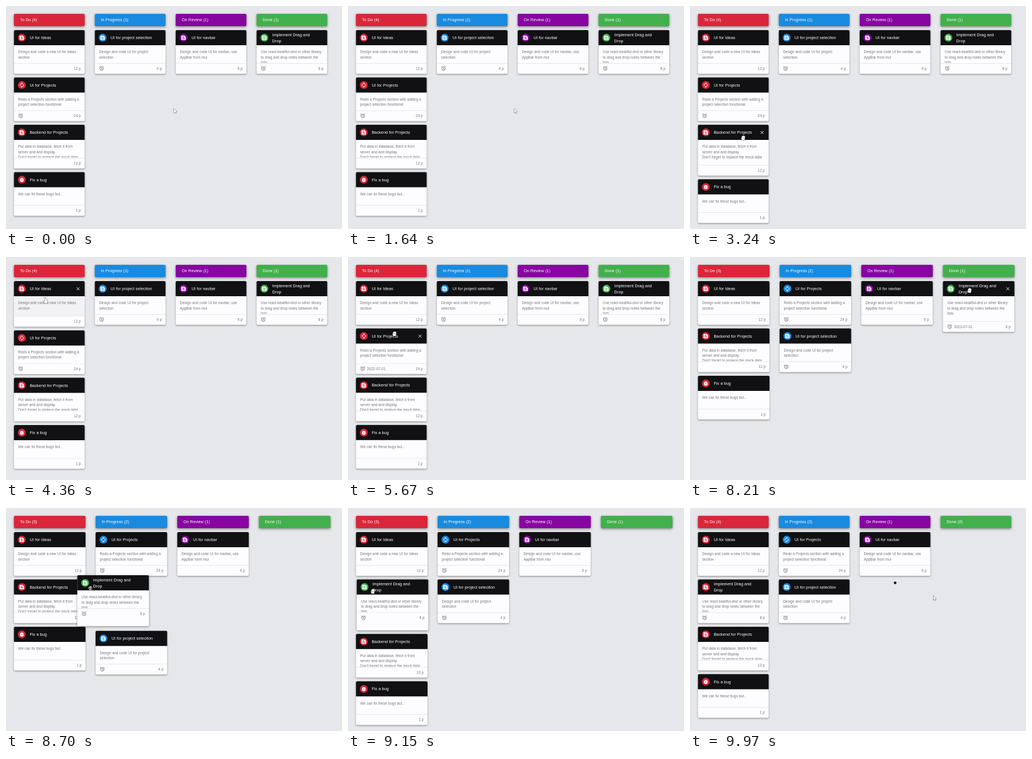
Recreate the animation shown at these times as an HTML page with a canvas. Size 600 by 398 pixels, loop 10000 ms.

```html
<!DOCTYPE html>
<html lang="en">
<head>
<meta charset="utf-8">
<title>Task board</title>
<style>
html, body { margin: 0; width: 100%; height: 100%; overflow: hidden; background: #e6e7ea; }
canvas { display: block; width: 600px; height: 398px; }
</style>
</head>
<body>
<canvas id="stage"></canvas>
<script>
const W = 600, H = 398, LOOP = 10000;
const cv = document.getElementById('stage');
const g = cv.getContext('2d');
const dpr = window.devicePixelRatio || 1;
cv.width = W * dpr;
cv.height = H * dpr;

const FONT = '"Liberation Sans", Arial, sans-serif';
const LEFT = 14.2, TOP = 43, CARD_H = 78, GAP = 6.5, HEAD = 27;
const EXTRA = [0, 0, 3.4, 12.8];
const COLUMNS = [['To Do', '#d9263a'], ['In Progress', '#1a8ade'], ['On Review', '#8706a0'], ['Done', '#42b04d']];

const card = (title, body, points, icon, alarm, hover) => ({ title, body, points, icon, alarm, hover });
const ideas = card(['UI for Ideas'], ['Design and code a new UI for Ideas', 'section'],
  12, 'doc', false, [[3780, 5560]]);
const projects = card(['UI for Projects'], ['Redo a Projects section with adding a', 'project selection functional'],
  24, 'sync', true, [[3450, 3780], [5560, 7600]]);
const backend = card(['Backend for Projects'],
  ['Put data in database, fetch it from', 'server and and display.', "Don't forget to replace the mock data"],
  12, 'doc', false, [[2600, 3450]]);
const bug = card(['Fix a bug'], ['We can fix these bugs but..'], 1, 'bug', false, []);
const picker = card(['UI for project seleciton'], ['Design and code UI for project', 'selection'], 4, 'doc', true, []);
const navbar = card(['UI for navbar'], ['Design and code UI for navbar, use', 'AppBar from mui'],
  6, 'doc', false, [[7780, 7950]]);
const dnd = card(['Implement Drag and', 'Drop'],
  ['Use react-beatiful-dnd or other library', 'to drag and drop notes between the', 'lists'],
  8, 'doc', true, [[8020, 9440]]);

// Board states; each drag ends by switching to the next state.
const STATES = [
  { end: 7520, pitch: 144.4, width: 126.3,
    lists: [[ideas, projects, backend, bug], [picker], [navbar], [dnd]],
    drag: { card: projects, lift: 6480, drop: 7220, dx: 68.7, dy: 16, to: [158.6, TOP],
      shifts: [[backend, 6707, -1], [bug, 6707, -1], [picker, 6880, 1]] } },
  { end: 9300, pitch: 145.8, width: 127.8,
    lists: [[ideas, backend, bug], [projects, picker], [navbar], [dnd]],
    drag: { card: dnd, lift: 8460, drop: 9060, dx: 23, dy: 22, to: [LEFT, TOP + CARD_H + GAP],
      shifts: [[picker, 8578, 1], [picker, 8740, -1], [backend, 8780, 1], [bug, 8780, 1]] } },
  { end: LOOP, pitch: 144.4, width: 126.3,
    lists: [[ideas, dnd, backend, bug], [projects, picker], [navbar], []] }
];

// Pointer path: time, x, y
const PATH = [
  [0, 300, 183], [700, 301, 186], [1640, 297, 183], [2090, 297, 183], [2500, 160, 222],
  [2720, 100, 247], [3200, 96, 238], [3500, 80, 195], [3900, 72, 100], [4360, 70, 72.5],
  [5000, 74, 79], [5300, 80, 90], [5760, 83, 142], [6060, 82.9, 143.5], [6480, 82.9, 143.5],
  [6790, 190, 99], [7000, 224, 64], [7200, 227, 59], [7520, 227, 60], [7880, 370, 72],
  [8210, 499, 60], [8400, 475, 65], [8460, 475, 65], [8700, 151, 142], [8900, 60, 148],
  [9060, 44, 149], [9380, 46, 149], [9500, 165, 152], [9750, 366, 133], [9890, 452, 150],
  [9970, 434.5, 156.5], [10000, 434.5, 156.5]
];

const clamp = v => Math.max(0, Math.min(1, v));
const step = (t, at, dur) => 1 - Math.pow(1 - clamp((t - at) / dur), 3);

function along(t, k) {
  const slope = i => i < 0 || i > PATH.length - 2 ? 0 : (PATH[i + 1][k] - PATH[i][k]) / (PATH[i + 1][0] - PATH[i][0]);
  const tangent = i => {
    const a = slope(i - 1), b = slope(i);
    return a * b <= 0 ? 0 : 2 * a * b / (a + b);
  };
  let i = 0;
  while (i < PATH.length - 2 && t >= PATH[i + 1][0]) i++;
  const d = PATH[i + 1][0] - PATH[i][0], u = (t - PATH[i][0]) / d, v = 1 - u;
  return PATH[i][k] * v * v * (1 + 2 * u) + PATH[i + 1][k] * u * u * (3 - 2 * u)
    + d * u * v * (v * tangent(i) - u * tangent(i + 1));
}

const extraOf = (c, t) => EXTRA[c.body.length] *
  c.hover.reduce((sum, [on, off]) => sum + step(t, on, 140) - step(t, off, 120), 0);

function box(x, y, w, h, r, fill) {
  g.fillStyle = fill;
  g.beginPath();
  g.roundRect(x, y, w, h, r);
  g.fill();
}

function shadow(on, blur = 3, dy = 1.2, alpha = 0.4) {
  g.shadowColor = on ? `rgba(0,0,0,${alpha})` : 'transparent';
  g.shadowBlur = on ? blur * dpr : 0;
  g.shadowOffsetY = on ? dy * dpr : 0;
}

function label(text, x, y, size, fill, align = 'left') {
  g.font = `${size}px ${FONT}`;
  g.letterSpacing = '0.068px';
  g.textAlign = align;
  g.fillStyle = fill;
  g.fillText(text, x, y);
}

function line(...p) {
  g.beginPath();
  for (let i = 0; i < p.length; i += 2) g.lineTo(p[i], p[i + 1]);
  g.stroke();
}

function poly(...p) {
  g.beginPath();
  for (let i = 0; i < p.length; i += 2) g.lineTo(p[i], p[i + 1]);
  g.closePath();
  g.fill();
}

function arc(x, y, r, a, b) {
  g.beginPath();
  g.arc(x, y, r, a, b);
  g.stroke();
}

// Icons are drawn on a 24-unit grid centred on 0,0.
const ICONS = {
  doc(color) {
    g.lineJoin = 'round';
    poly(-9, -8, -8, -9, 3, -9, 9, -3, 9, 8, 8, 9, -8, 9, -9, 8);
    g.strokeStyle = color;
    g.lineWidth = 2;
    line(-5, -4, 2, -4);
    line(-5, 0, 5, 0);
    line(-5, 4, 5, 4);
  },
  sync() {
    g.lineWidth = 2.2;
    for (let i = 0; i < 2; i++) {
      arc(0, 0, 7, 2.55, Math.PI * 1.5);
      poly(0, -11, 4, -7, 0, -3);
      g.rotate(Math.PI);
    }
  },
  bug(color) {
    g.beginPath();
    g.roundRect(-6, -7, 12, 16, 6);
    g.fill();
    g.lineWidth = 2;
    for (const y of [-3, 1, 5]) line(-8, y, 8, y);
    line(-4.5, -8.5, -2, -6);
    line(4.5, -8.5, 2, -6);
    g.strokeStyle = color;
    line(-2, -1, 2, -1);
    line(-2, 3, 2, 3);
  },
  alarm() {
    g.lineWidth = 2;
    arc(0, 1, 8, 0, 7);
    line(0, -4, 0, 2, 4, 4);
    line(-10, -6, -5.5, -9.8);
    line(10, -6, 5.5, -9.8);
  }
};

function icon(name, x, y, scale, ink, back) {
  g.save();
  g.translate(x, y);
  g.scale(scale, scale);
  g.fillStyle = g.strokeStyle = ink;
  ICONS[name](back);
  g.restore();
}

function drawCard(c, x, y, w, h, e, color, over, lifted) {
  shadow(true, lifted ? 4 : 3);
  box(x, y, w, h, 2, '#fdfcfe');
  shadow(false);
  if (over === 'body') box(x, y + HEAD, w, 34.5 + e - 2.5, 0, '#f2f1f3');
  box(x, y, w, HEAD, [2, 2, 0, 0], '#111113');

  g.fillStyle = color;
  g.beginPath();
  g.arc(x + 14, y + 13.6, 7, 0, 7);
  g.fill();
  icon(c.icon, x + 14, y + 13.6, 0.44, '#fff', color);

  const n = c.title.length;
  c.title.forEach((s, i) => label(s, x + 28.2, y + 16.1 + (i - (n - 1) / 2) * 10.9, 7.28, '#fff'));
  if (over) {
    g.strokeStyle = '#fff';
    g.lineWidth = 0.95;
    const cx = x + w - 11.8, cy = y + 13.7, r = 2.5;
    line(cx - r, cy - r, cx + r, cy + r);
    line(cx - r, cy + r, cx + r, cy - r);
  }

  g.save();
  g.beginPath();
  g.rect(x, y + HEAD, w, 31.6 + e);
  g.clip();
  c.body.forEach((s, i) => label(s, x + 7.6, y + 41.4 + i * 9.1, 6.37, '#757477'));
  g.restore();

  box(x, y + 59 + e, w, 0.7, 0, '#dfdee1');
  label(c.points + ' p', x + w - 6.8, y + 70.7 + e, 6.37, '#757477', 'right');
  if (c.alarm) {
    icon('alarm', x + 12, y + 68.4 + e, 0.39, '#59585b');
    if (over) label('2022-07-01', x + 19.8, y + 70.7 + e, 6.37, '#757477');
  }
}

function drawPointer(kind, x, y) {
  g.save();
  g.translate(x, y);
  g.fillStyle = '#fff';
  g.strokeStyle = '#222';
  g.lineWidth = 0.8;
  g.lineJoin = 'round';
  g.beginPath();
  if (kind === 'arrow') {
    for (const [px, py] of [[0, 0], [0, 7.6], [1.8, 6.1], [3, 8.8], [4.2, 8.2], [3, 5.7], [5.2, 5.5]]) g.lineTo(px, py);
    g.closePath();
  } else if (kind === 'point') {
    for (const [px, py] of [[-0.7, 0], [0.7, 0], [0.9, 3.6], [4.4, 4.5], [4.6, 7], [3.6, 10], [-0.6, 10],
      [-3.2, 6.5], [-2.5, 5.6], [-0.8, 6.8]]) g.lineTo(px, py);
    g.closePath();
  } else {
    const tall = kind === 'open' ? -3.8 : -1.8;
    for (let i = 0; i < 4; i++) g.roundRect(-2.4 + i * 1.4, tall + (i % 3 ? -0.4 : 0.4), 1.5, 4, 0.7);
    g.moveTo(-3.8, 0);
    g.lineTo(-1.8, 3.8);
    g.lineTo(2.4, 3.8);
    g.lineTo(3.2, 0);
    g.closePath();
  }
  g.stroke();
  g.fill();
  g.restore();
}

function draw(t) {
  g.setTransform(dpr, 0, 0, dpr, 0, 0);
  g.fillStyle = '#e6e7ea';
  g.fillRect(0, 0, W, H);
  const state = STATES.find(s => t < s.end);
  const drag = state.drag && t >= state.drag.lift ? state.drag : null;
  const mx = along(t, 1), my = along(t, 2), w = state.width;
  const room = drag ? CARD_H + extraOf(drag.card, t) + GAP : 0;
  let kind = 'arrow', held = null;

  state.lists.forEach((list, i) => {
    const x = LEFT + i * state.pitch, [name, color] = COLUMNS[i];
    shadow(true, 4, 1.4, 0.45);
    box(x, 14, w, 22, 2, color);
    shadow(false);
    label(`${name} (${list.length})`, x + 10.9, 27.3, 7.28, '#fff');

    let top = TOP;
    for (const c of list) {
      const e = extraOf(c, t), h = CARD_H + e;
      if (drag && c === drag.card) {
        held = { h, color };
      } else {
        let y = top;
        if (drag) for (const [who, at, dir] of drag.shifts) if (who === c) y += dir * room * step(t, at, 200);
        let over = null;
        if (!drag && mx > x && mx < x + w && my > y && my < y + h) {
          over = my < y + HEAD ? 'head' : my < y + 59 + e ? 'body' : 'foot';
          kind = { head: 'open', body: 'point', foot: 'arrow' }[over];
        }
        drawCard(c, x, y, w, h, e, color, over, false);
      }
      top += h + GAP;
    }
  });

  if (held) {
    const p = step(t, drag.drop, state.end - drag.drop - 20);
    const at = Math.min(t, drag.drop);
    const x = along(at, 1) - drag.dx, y = along(at, 2) - drag.dy;
    drawCard(drag.card, x + (drag.to[0] - x) * p, y + (drag.to[1] - y) * p, w, held.h, 0, held.color, null, true);
    kind = t < drag.drop ? 'closed' : 'open';
  }

  if (t >= 9880) {
    g.fillStyle = '#111113';
    g.beginPath();
    g.arc(366.3, 133.6, 2.4, 0, 7);
    g.fill();
  }
  drawPointer(kind, mx, my);
}

const start = performance.now();
function tick() {
  draw((performance.now() - start) % LOOP);
  requestAnimationFrame(tick);
}
tick();
</script>
</body>
</html>
```
